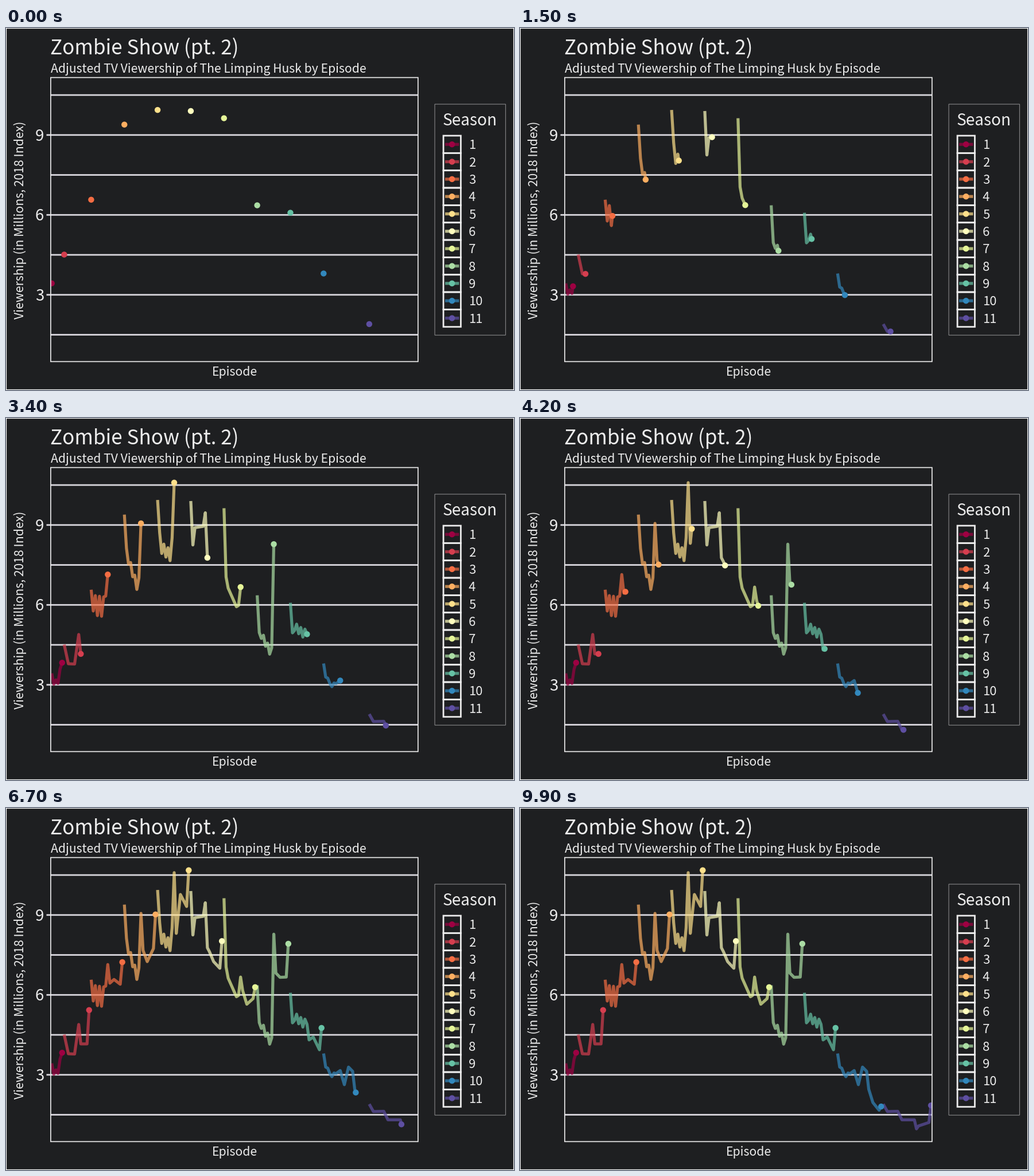
Animation of 885 by 632 pixels, one loop 10 s. Source, as a matplotlib script:

```python
import numpy as np
import matplotlib.pyplot as plt
from matplotlib.animation import FuncAnimation
from matplotlib.patches import Circle, Rectangle

W, H, DPI = 885, 632, 100
FRAMES, INTERVAL = 100, 100
PX = 72 / DPI

BG, INK, GRID = "#1e1f21", "#ececec", "#d9d7dd"
LEFT, RIGHT, TOP, BOTTOM = 77.9, 717.8, 86.5, 582.4
EPISODES, LONGEST = 177, 24
STEP = (RIGHT - LEFT) / EPISODES
LINE_W, RADIUS, ALPHA = 5.2, 5.2, 0.7

SPECTRAL = ["#9e0142", "#d53e4f", "#f46d43", "#fdae61", "#fee08b", "#ffffbf",
            "#e6f598", "#abdda4", "#66c2a5", "#3288bd", "#5e4fa2"]

plt.rcParams["font.family"] = "Noto Sans CJK JP"
fig = plt.figure(figsize=(W / DPI, H / DPI), dpi=DPI, facecolor=BG)
ax = fig.add_axes([0, 0, 1, 1])
ax.set_xlim(0, W)
ax.set_ylim(H, 0)
ax.axis("off")


def y_px(value):
    return 186.8 - (value - 9) * 46.5


def text(x, y, s, size, **kw):
    ax.text(x, y, s, fontsize=size * PX, color=INK, va="baseline", **kw)


def stroke(xs, ys, color, width, **kw):
    return ax.plot(xs, ys, color=color, lw=width * PX, snap=False,
                   solid_capstyle="butt", solid_joinstyle="round", **kw)[0]


def dot(x, y, color):
    return ax.add_patch(Circle((x, y), RADIUS, fc=color, lw=0,
                               snap=False, zorder=4))


def box(x0, y0, x1, y1, color, width, **kw):
    return ax.add_patch(Rectangle((x0, y0), x1 - x0, y1 - y0, fill=False,
                                  ec=color, lw=width * PX, snap=False, **kw))


# Frame, titles and axes
box(0, 0, W, H, "white", 2.2)
text(77, 45.5, "Zombie Show (pt. 2)", 35)
text(77.5, 78, "Adjusted TV Viewership of The Limping Husk by Episode", 21.2)
text(398, 606.5, "Episode", 21.2, ha="center")
text(31, 335, "Viewership (in Millions, 2018 Index)", 21.2, ha="center",
     rotation=90, rotation_mode="anchor")

for v in np.arange(1.5, 11, 1.5):
    stroke([LEFT, RIGHT], [y_px(v)] * 2, GRID, 2.8, zorder=1)
for v in (3, 6, 9):
    stroke([70.5, LEFT], [y_px(v)] * 2, GRID, 2.8, zorder=1)
    text(66, y_px(v) + 10, str(v), 27.5, ha="right")
panel = box(LEFT, TOP, RIGHT, BOTTOM, INK, 1.7, zorder=5)

# Legend
KEY = 30.34
box(747, 133, 870.3, 536.2, "#a2a2a3", 0.9)
text(761, 170.5, "Season", 27.9)
for i, c in enumerate(SPECTRAL):
    top = 188 + i * KEY
    mid = top + KEY / 2
    box(762, top, 762 + KEY, top + KEY, INK, 2.8, zorder=2)
    stroke([765, 789.3], [mid, mid], c, LINE_W, alpha=ALPHA, zorder=3)
    dot(777, mid, c)
    text(806, mid + 8, str(i + 1), 22)


def curve(turns, levels, swing):
    """Straight runs between turning points; early on, every second
    episode after a turn swings away from the run."""
    ep = np.arange(1, turns[-1] + 1)
    last_turn = np.array([max(t for t in turns if t <= e) for e in ep])
    swings = ((ep - last_turn) % 2 == 1) & (ep < 8)
    return np.interp(ep, turns, levels) + swing * swings


class Season:
    """One season's curve, revealed episode by episode."""
    arrivals = np.round(np.arange(LONGEST) * (FRAMES - 1) / (LONGEST - 1))

    def __init__(self, first, color, values):
        self.n = len(values)
        self.x = LEFT + STEP * (first - 0.5 + np.arange(self.n))
        self.y = y_px(values)
        self.line = stroke([], [], color, LINE_W, alpha=ALPHA, zorder=3)
        self.dot = dot(self.x[0], self.y[0], color)
        for artist in (self.line, self.dot):
            artist.set_clip_path(panel)

    def reveal(self, frame):
        idx = np.arange(self.n)
        pos = np.interp(frame, self.arrivals[:self.n], idx)
        hx, hy = np.interp(pos, idx, self.x), np.interp(pos, idx, self.y)
        k = int(np.ceil(pos))
        self.line.set_data(np.append(self.x[:k], hx), np.append(self.y[:k], hy))
        self.dot.center = hx, hy
        return self.line, self.dot


seasons = []


def add(turns, levels, swing=0):
    first = 1 + sum(s.n for s in seasons)
    color = SPECTRAL[len(seasons)]
    seasons.append(Season(first, color, curve(turns, levels, swing)))


# Premiere drop, slump, mid-season return, sag and finale
FULL = (1, 2, 3, 7, 8, 9, 10, 12, 15, 16)

add((1, 2, 4, 6), (3.43, 3.02, 3.05, 3.83), 0.15)
add((1, 3, 6, 8, 9, 12, 13), (4.51, 3.79, 3.78, 4.89, 4.16, 4.16, 5.43))
add(FULL, (6.57, 5.77, 6.35, 6.30, 6.33, 7.14, 6.44, 6.58, 6.40, 7.23), -0.74)
add(FULL, (9.39, 8.13, 7.53, 6.58, 7.02, 9.06, 7.67, 7.25, 7.74, 9.02), 0.3)
add(FULL, (9.94, 8.71, 7.93, 7.66, 8.52, 10.59, 8.31, 9.77, 9.32, 10.68), 0.42)
add(FULL, (9.90, 8.25, 8.90, 8.95, 9.46, 7.77, 7.62, 7.25, 7.00, 8.02))
add(FULL, (9.63, 7.05, 6.63, 5.93, 5.98, 6.67, 6.16, 5.65, 5.86, 6.29))
add(FULL, (6.36, 4.96, 4.74, 4.15, 4.39, 8.28, 6.82, 6.66, 6.67, 7.92), 0.27)
add(FULL, (6.08, 4.95, 5.04, 4.79, 5.09, 4.90, 4.31, 4.42, 3.94, 4.76), 0.3)
add((1, 2, 5, 9, 11, 13, 15, 16, 18, 21, 22),
    (3.80, 3.29, 2.93, 3.16, 2.63, 3.29, 3.13, 2.46, 1.96, 1.67, 1.81), 0.08)
add((1, 3, 8, 10, 16, 17, 18, 23, 24),
    (1.90, 1.62, 1.63, 1.31, 1.31, 0.97, 1.08, 1.21, 1.85))


def draw(frame):
    return [a for s in seasons for a in s.reveal(frame)]


anim = FuncAnimation(fig, draw, frames=FRAMES, interval=INTERVAL,
                     init_func=lambda: draw(0), repeat=True, repeat_delay=0)
plt.show()
```
